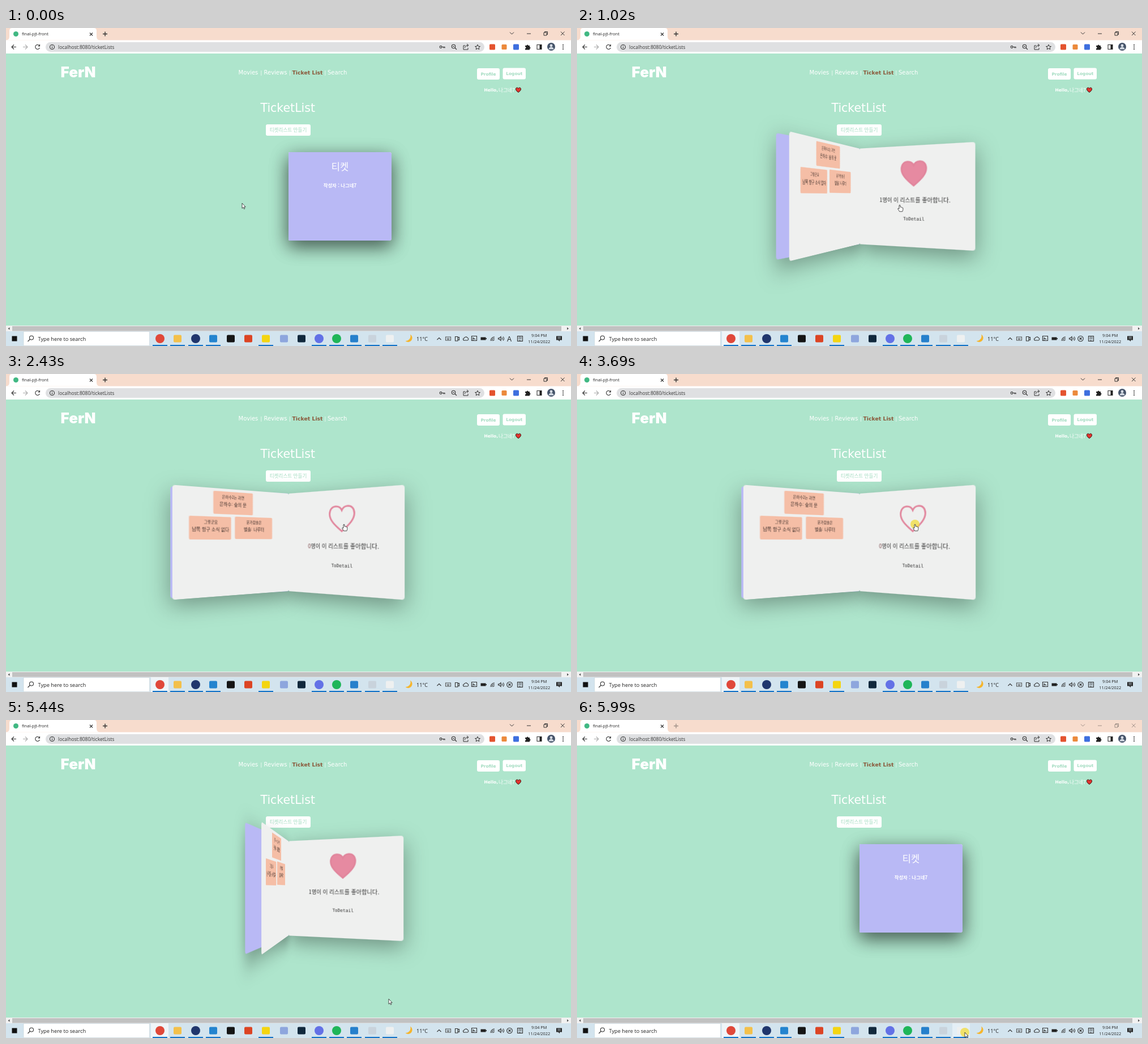
Recreate the animation shown at these times as an HTML page. Size 998x561 px, loop 6060 ms.

```html
<!DOCTYPE html>
<html lang="ko">
<head>
<meta charset="utf-8">
<title>Ticket list</title>
<style>
html, body { margin: 0; width: 100%; height: 100%; overflow: hidden; }
body { position: relative; background: #aee5cc; --kr: "Noto Sans CJK KR", "Noto Sans CJK", "Noto Sans CJK JP", sans-serif; }
svg { display: block; }
.layer { position: absolute; left: 0; top: 0; width: 998px; height: 561px; }
.ui { font-family: "Open Sans", "Noto Sans", sans-serif; fill: #222; }
.web { font-family: "DejaVu Sans", sans-serif; fill: #fff; }
.kr { font-family: var(--kr); }
.line { fill: none; stroke: #333; stroke-width: 1.1; }
.label { fill: #a3dcc1; }

.book { position: absolute; left: 499px; top: 297px; width: 0; height: 0; perspective: 659px; }
.spread { position: absolute; left: 0; top: 0; transform-style: preserve-3d; transform: translateZ(calc(var(--p) * 61.6px)); }
.leaf { position: absolute; left: 0; top: -78px; width: 182px; height: 156px; font-family: var(--kr);
  transform-origin: 0 50%; border-radius: 2px 4px 4px 2px; background: #eff0ef; color: #333; }
.right, .cover { box-shadow: 0 10px 32px rgba(0, 0, 0, .36); }
.right { transform: rotateY(calc(var(--p) * -30deg)); }
.cover { transform: rotateY(calc(var(--p) * -155deg)); background: #b9b9f5; color: #fff; }
.left { left: -182px; transform-origin: 100% 50%; border-radius: 4px 2px 2px 4px; transform: rotateY(calc(180deg - var(--turn) * 1deg)); }
.leaf p { position: absolute; left: 0; width: 100%; margin: 0; text-align: center; line-height: 0; white-space: nowrap; }
.leaf svg { position: absolute; left: 70px; top: 23px; }
.ticket { position: absolute; width: 63px; height: 33px; box-sizing: border-box; background: #f5bea6;
  border: 0 dotted #eff0ef; border-width: 0 1.4px; border-radius: 2px; color: #3a2c28; font-weight: 500; }
.ticket p:first-child { top: 8px; font-size: 5.5px; }
.ticket p:last-child { top: 18px; font-size: 6.7px; }
</style>
</head>
<body>
<svg class="layer ui" viewBox="0 0 998 561">
  <!-- tab strip -->
  <rect width="998" height="24" fill="#f7dccd"/>
  <path d="M0 21.500Q6 21 6 15V5Q6 0 11 0H155Q160 0 160 5V15Q160 21 166 21.500Z" fill="#fff"/>
  <circle cx="17.500" cy="10.500" r="4.500" fill="#41b883"/>
  <text x="28" y="13.200" font-size="7.600">final-pjt-front</text>
  <path class="line" d="M148 8.500l5 5m0-5l-5 5"/>
  <g id="controls" class="line">
    <path d="M171 10.500h8m-4-4v8" stroke-width="1.400"/>
    <path d="M890 7.500l3.500 3.500 3.500-3.500M920 10h7M950 8h5v5h-5zM951.500 8V6.500h5V11.500H955M980 6.500l6.500 6.500m0-6.500l-6.500 6.500" stroke-width="1"/>
  </g>
  <!-- toolbar -->
  <rect y="21.500" width="998" height="23.500" fill="#fff"/>
  <rect x="70" y="25" width="775" height="17" rx="8.500" fill="#dfe0e2"/>
  <path class="line" d="M18 33.500h-8m4-4l-4 4 4 4"/>
  <path class="line" d="M30 33.500h8m-4-4l4 4-4 4" style="stroke:#aaa"/>
  <path class="line" d="M59 31a4 4 0 1 0 .5 4M59.500 29v3h-3"/>
  <circle class="line" cx="81.500" cy="33.500" r="4"/>
  <path class="line" d="M81.500 33v2.700M81.500 31v1"/>
  <text x="92" y="36.600" font-size="8.500" fill="#333">localhost:8080/ticketLists</text>
  <g class="line">
    <circle cx="768" cy="33.500" r="1.900"/><path d="M770 33.500h5v2M773 33.500v2"/>
    <circle cx="790.500" cy="32.500" r="3.200"/><path d="M793 35l3 3M789 32.500h3"/>
    <path d="M811 31h-3v7h8v-3M810.500 35q.5-4.500 6-4.500M814 28l3 2.500-3 2.500" stroke-width="1"/>
    <path d="M833 29.300l1.300 2.900 3.200.3-2.400 2.100.7 3.200-2.800-1.700-2.800 1.700.7-3.200-2.400-2.100 3.200-.3z" stroke-width="1"/>
    <path d="M938 29.500h8v8h-8z"/>
  </g>
  <rect x="854" y="28.500" width="10" height="10" rx="1.500" fill="#e4532f"/>
  <rect x="875.500" y="29" width="9" height="9" rx="1.500" fill="#ec8a3c"/>
  <rect x="896" y="28.500" width="10" height="10" rx="1.500" fill="#3e6fdf"/>
  <path d="M917 31h2.500a1.500 1.500 0 0 1 3 0h2.500v2.500a1.500 1.500 0 0 1 0 3V38.500h-8v-2.500a1.500 1.500 0 0 0 0-3z"/>
  <path d="M942.500 29.500h3.500v8h-3.500z"/>
  <circle cx="963" cy="33" r="7" fill="#46546a"/>
  <circle cx="963" cy="31" r="2.400" fill="#d5dbe4"/><path d="M958.500 37.500a4.500 4 0 0 1 9 0z" fill="#d5dbe4"/>
  <circle cx="984" cy="30" r="1"/><circle cx="984" cy="33.500" r="1"/><circle cx="984" cy="37" r="1"/>
  <!-- web page -->
  <g class="web">
    <text x="96.500" y="87" font-family="Inter, sans-serif" font-weight="900" font-size="26">FerN</text>
    <g font-size="10">
      <text x="410.500" y="81.800">Movies</text><text x="449.500" y="81.500" font-size="8">|</text>
      <text x="455.500" y="81.800">Reviews</text><text x="500.300" y="81.500" font-size="8">|</text>
      <text x="505.500" y="81.800" font-size="9.300" font-weight="bold" fill="#8a5638">Ticket List</text>
      <text x="562.500" y="81.500" font-size="8">|</text><text x="568" y="81.800">Search</text>
    </g>
    <text x="449.500" y="148" font-size="20.500">TicketList</text>
    <rect x="459" y="170" width="79" height="20" rx="3"/>
    <text class="kr label" x="498.500" y="183" font-size="8.600" text-anchor="middle">티켓리스트 만들기</text>
    <rect x="832" y="71" width="40" height="20" rx="3"/><rect x="877.500" y="70.500" width="40.500" height="20" rx="3"/>
    <g class="label" font-size="7.400" font-weight="bold" text-anchor="middle">
      <text x="852" y="83.600">Profile</text><text x="897.800" y="83.200">Logout</text>
    </g>
    <text x="844.500" y="112.300" font-size="7.500" font-weight="bold">Hello,</text>
    <text class="kr" x="870" y="112.500" font-size="8.600" font-weight="500">나그네7</text>
    <path d="M905 113.500c-3-2-4.500-3.600-4.500-5.800 0-3 3.500-3.300 4.500-1 1-2.300 4.500-2 4.500 1 0 2.200-1.500 3.800-4.500 5.800z" fill="#e2342f" stroke="#3b1512"/>
  </g>
  <!-- scroll bar -->
  <rect y="525" width="998" height="10" fill="#f1f1f1"/>
  <rect id="thumb" x="11" y="526" width="970" height="8.500" fill="#c1c1c1"/>
  <path d="M6.500 528v4.500l-3-2.250zM991 528v4.500l3-2.250z" fill="#555"/>
  <!-- task bar -->
  <rect y="535" width="998" height="26" fill="#d3e4ee"/>
  <rect x="31" y="535.500" width="222.500" height="25" fill="#fff" stroke="#c3cfd6" stroke-width=".6"/>
  <rect x="10.500" y="543.500" width="9" height="9" fill="#111"/>
  <circle class="line" cx="45" cy="546.500" r="3.500"/><path class="line" d="M42.500 549l-4 4"/>
  <text x="56.500" y="551.500" font-size="9.250">Type here to search</text>
  <rect id="active" x="256" y="535" width="31" height="26" fill="#eff5f9"/>
  <rect id="hover" x="663" y="535" width="31" height="26" fill="#e4eff6"/>
  <g id="apps"></g>
  <path d="M714 540.500a7.200 7.200 0 1 1-8.500 11.500a8.500 8.500 0 0 0 8.500-11.500z" fill="#f6b52c"/>
  <text x="725" y="551.700" font-size="9.100">11°C</text>
  <g class="line">
    <path d="M761.500 550l3.500-3.500 3.500 3.500"/>
    <path d="M776.500 545h9v6h-9zM778.500 547.500h5M779 549.500h4" stroke="#555"/>
    <path d="M793.500 544.500h4.500v7.500h-4.500zM798 546.500l2.500-1v5l-2.500-1"/>
    <path d="M809.500 551a2 2 0 0 1 0-4 3 3 0 0 1 5.500-.5 2.300 2.300 0 0 1 0 4.500z"/>
    <path d="M822.500 543.500h9v8h-9zM825 551.500v-5l4 3"/>
    <path d="M856 552a7 7 0 0 1 7-7M858 552a5 5 0 0 1 5-4.500M860 552a3 3 0 0 1 3-2"/>
    <path d="M869.500 547h2l2.500-2.500v7l-2.500-2.500h-2zM876 546q1.500 2 0 4M878 544.500q3 3.500 0 7"/>
    <path d="M903.500 543.500h9v9h-9z"/>
  </g>
  <path d="M838.500 545.500h9v5h-9z"/><path d="M847.500 547h1.500v2h-1.500z"/>
  <text id="latin" x="885" y="552.500" font-size="12" font-weight="500" font-family="Liberation Sans, sans-serif">A</text>
  <g id="off" class="line"><circle cx="889.500" cy="548" r="4.800"/><path d="M887.500 546l4 4m0-4l-4 4"/></g>
  <text class="kr" x="908" y="550.800" font-size="7.500" text-anchor="middle">한</text>
  <text x="941.700" y="544.800" font-size="7.300" text-anchor="middle">9:04 PM</text>
  <text x="941.700" y="556.300" font-size="7.300" text-anchor="middle">11/24/2022</text>
  <path d="M972 543.500h10v7h-4v2.500l-2.500-2.500h-3.500z"/>
  <path d="M974 545.500h6M974 548h6" stroke="#d3e4ee" stroke-width=".8"/>
</svg>

<div class="book"><div class="spread" id="spread">
  <div class="leaf right">
    <svg width="42" height="40" viewBox="0 0 42 40"><path id="heart" d="M21 38.500C8 28 1.500 21 1.500 12.500C1.500 5.500 6 1.500 11.500 1.500C16 1.500 19.500 4 21 7.500C22.500 4 26 1.500 30.500 1.500C36 1.500 40.500 5.500 40.500 12.500C40.500 21 34 28 21 38.500Z" stroke="#e1859c" stroke-width="2.600"/></svg>
    <p style="top:84px;font-size:8.800px"><span id="count">1</span>명이 이 리스트를 좋아합니다.</p>
    <p style="top:112.500px;font:7px/0 'DejaVu Sans Mono',monospace">ToDetail</p>
  </div>
  <div class="leaf left">
    <div class="ticket" style="left:56.500px;top:3.500px"><p>은하수2는 과연</p><p>은하수: 숲의 문</p></div>
    <div class="ticket" style="left:22.400px;top:40.500px"><p>그렇군요</p><p>남쪽 항구 소식 없다</p></div>
    <div class="ticket" style="left:90.200px;top:40px"><p>문가람솔은</p><p>별솔: 나루터</p></div>
  </div>
  <div class="leaf cover">
    <p style="top:25px;font-size:16.500px;font-weight:500">티켓</p>
    <p style="top:58px;font-size:8.400px;font-weight:700">작성자 : 나그네7</p>
  </div>
</div></div>

<svg class="layer" viewBox="0 0 998 561">
  <circle id="press" r="8" fill="#f2dc3c" fill-opacity=".75"/>
  <g id="cursor" fill="#fff" stroke="#222" stroke-width=".8" stroke-linejoin="round">
    <path id="arrow" d="M0 0V9.200L2.100 7.300L3.500 10.300L4.900 9.700L3.500 6.700H6.200Z"/>
    <path id="hand" d="M-1 .8Q0-.6 1 .8V4Q2 3.200 2.800 4.300Q4 3.800 4.400 4.900Q5.700 4.600 5.800 6V8.500Q5.500 10.300 4.800 11.800H-.4Q-1.500 9.500-3.300 7.300Q-3.400 5.800-1.800 6.400L-1 7.200Z"/>
  </g>
</svg>

<script>
const LOOP = 6060;
const $ = id => document.getElementById(id);
const show = (id, on) => { $(id).style.display = on ? '' : 'none'; };

// Task bar buttons: centre x, shape, colour, running
const apps = [
  [272, 'c', '#e0483a', 1], [303, 's', '#f3c04b', 1], [335, 'c', '#20366d', 1], [366, 's', '#2484cf', 1],
  [397, 's', '#151515', 0], [428, 's', '#dc4424', 0], [459, 's', '#f4d511', 1], [491, 's', '#8ea6dd', 0],
  [522, 's', '#11283c', 0], [553, 'c', '#6371e6', 1], [584, 'c', '#1fb659', 1], [615, 's', '#2680cc', 1],
  [647, 's', '#c9d3dc', 1], [678, 's', '#eef0f0', 1]
];
$('apps').innerHTML = apps.map(([x, kind, fill, runs]) =>
  (kind === 'c' ? `<circle cx="${x}" cy="548" r="8" fill="${fill}"/>`
    : `<rect x="${x - 7}" y="541.500" width="14" height="13" rx="2" fill="${fill}"/>`) +
  (runs ? `<rect x="${x - 13}" y="559" width="26" height="2" fill="#1473c8"/>` : '')).join('');

// The screen was sampled: pointer keys are [time, x, y] and hold until the next
const path = [
  [0, 417, 309], [390, 418, 309], [460, 420, 309], [530, 424, 309], [600, 432, 310], [670, 450, 311],
  [740, 480, 312], [800, 535, 312], [870, 566, 311], [950, 570, 312], [1490, 577, 306], [1560, 584, 300],
  [1630, 591, 292], [1700, 598, 283], [1770, 603, 275], [1840, 604, 269], [1900, 600, 266], [2030, 597, 265],
  [5090, 604, 283], [5160, 612, 300], [5230, 622, 325], [5300, 640, 365], [5370, 660, 430], [5440, 676, 492],
  [5510, 681, 515], [5580, 682, 526], [5650, 682, 533], [5720, 684, 545], [5790, 685, 551]
];
const ticks = path.map(k => k[0]).concat(1020, 1090, 1150, 1220).sort((a, b) => a - b);
const lastOf = (list, t, time = v => v) => list.filter(v => time(v) <= t).pop();

const bezier = (a, b, s) => 3 * a * s * (1 - s) ** 2 + 3 * b * s * s * (1 - s) + s ** 3;
function ease(u) {
  if (u <= 0) return 0;
  if (u >= .9) return 1;
  let lo = 0, hi = 1;
  for (let i = 0; i < 24; i++) {
    const mid = (lo + hi) / 2;
    if (bezier(.25, .25, mid) < u) lo = mid; else hi = mid;
  }
  return bezier(.1, 1, lo);
}

function render(t) {
  const tick = lastOf(ticks, t);
  const p = ease((tick - 770) / 500) - ease((tick - 5336) / 500);
  $('spread').style.setProperty('--p', p);
  $('spread').style.setProperty('--turn', 145 * p + 5 * p ** 6);

  const [, x, y] = lastOf(path, t, k => k[0]);
  const hand = t >= 800 && t < 5370;
  $('cursor').setAttribute('transform', `translate(${x} ${y})`);
  show('arrow', !hand);
  show('hand', hand);
  show('press', t >= 2290 && t < 2430 || t >= 3690 && t < 3830 || t >= 5990);
  $('press').setAttribute('cx', x);
  $('press').setAttribute('cy', y);

  const liked = t < 2430 || t >= 3760;
  $('heart').setAttribute('fill', liked ? '#e68aa1' : 'none');
  $('count').textContent = liked ? 1 : 0;
  $('count').style.color = !liked ? '#7c4a4c' : t >= 3760 && t < 5160 ? '#dc5c78' : '';

  $('active').style.opacity = t < 70 ? 0 : t < 120 ? .5 : 1;
  show('hover', t >= 5720);
  show('latin', t < 740);
  show('off', t >= 740);
  $('thumb').setAttribute('fill', t >= 5580 && t < 5650 ? '#a8a8a8' : '#c1c1c1');
  $('controls').style.opacity = t >= 5990 ? .45 : 1;
}

const start = performance.now();
function loop() {
  render((performance.now() - start) % LOOP);
  requestAnimationFrame(loop);
}
loop();
</script>
</body>
</html>
```
